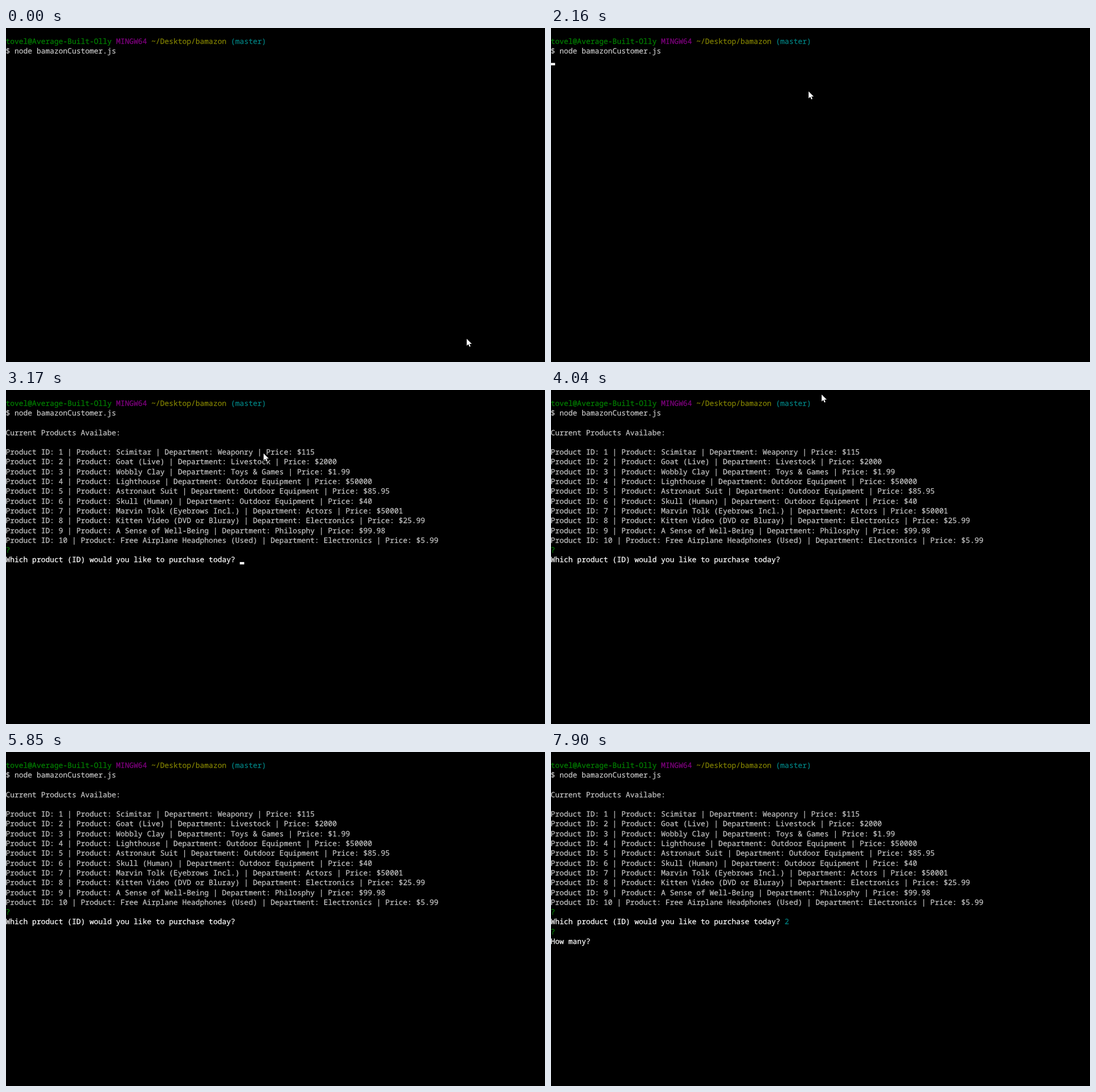
Write an HTML page that moves like this. It is 950 px wide and 590 px high and loops after 8000 ms.

```html
<!DOCTYPE html>
<html lang="en">
<head>
<meta charset="utf-8">
<title>Terminal shop</title>
<style>
  html, body { margin: 0; width: 100%; height: 100%; overflow: hidden; background: #000; }
  svg { display: block; }
  text {
    font: 12.977px "Noto Sans Mono", "DejaVu Sans Mono", monospace;
    font-variant-ligatures: none;
    text-rendering: geometricPrecision;
    white-space: pre;
    color: #c4c4c4;
  }
  tspan { fill: currentColor; stroke: currentColor; stroke-width: 0.25; }
  .green { color: #008000; }
  .purple { color: #800080; }
  .olive { color: #808000; }
  .teal { color: #008080; }
  .white { color: #fff; }
  #pointer { fill: #fff; stroke: #000; stroke-width: 1.6; paint-order: stroke; }
</style>
</head>
<body>
<svg id="stage" width="950" height="590" viewBox="0 0 950 590">
  <g id="screen"></g>
  <rect id="caret" width="7.8" height="4.2" fill="#fff"/>
  <path id="pointer" d="M0 0V12.3L2.9 9.6L4.8 14L6.8 13.2L4.9 8.9H9Z"/>
</svg>
<script>
const LOOP = 8000, LEFT = -0.6, CELL = 7.786, TOP = 27.6, PITCH = 17.3;
const $ = id => document.getElementById(id);
const svg = name => document.createElementNS("http://www.w3.org/2000/svg", name);
const baseline = row => TOP + PITCH * row;

// Adds one terminal line made of [text, colour] runs.
function line(parent, row, ...runs) {
  const text = svg("text");
  text.setAttribute("x", LEFT);
  text.setAttribute("y", Math.round(baseline(row)));
  for (const [str, colour] of runs) {
    const span = svg("tspan");
    span.textContent = str;
    if (colour) span.setAttribute("class", colour);
    text.append(span);
  }
  parent.append(text);
}

// A group of lines visible from one time up to another.
const blocks = [];
function block(from, to) {
  const g = svg("g");
  $("screen").append(g);
  blocks.push({ g, from, to });
  return g;
}

const products = [
  ["Scimitar", "Weaponry", "115"],
  ["Goat (Live)", "Livestock", "2000"],
  ["Wobbly Clay", "Toys & Games", "1.99"],
  ["Lighthouse", "Outdoor Equipment", "50000"],
  ["Astronaut Suit", "Outdoor Equipment", "85.95"],
  ["Skull (Human)", "Outdoor Equipment", "40"],
  ["Marvin Tolk (Eyebrows Incl.)", "Actors", "50001"],
  ["Kitten Video (DVD or Bluray)", "Electronics", "25.99"],
  ["A Sense of Well-Being", "Philosphy", "99.98"],
  ["Free Airplane Headphones (Used)", "Electronics", "5.99"]
];
const question = ["Which product (ID) would you like to purchase today? ", "white"];

const prompt = block(0, LOOP);
line(prompt, 0, ["tovel@Average-Built-Olly ", "green"], ["MINGW64 ", "purple"],
  ["~/Desktop/bamazon ", "olive"], ["(master)", "teal"]);
line(prompt, 1, ["$ node bamazonCustomer.js"]);

const list = block(2240, LOOP);
line(list, 3, ["Current Products Availabe:"]);
products.forEach(([name, dept, price], i) => line(list, 5 + i,
  [`Product ID: ${i + 1} | Product: ${name} | Department: ${dept} | Price: $${price}`]));
line(list, 15, ["?", "green"]);
line(list, 16, question);

const indent = " ".repeat(question[0].length);
line(block(6600, 6670), 16, [indent + "2"]);

const answer = block(6670, LOOP);
line(answer, 16, [indent], ["2", "teal"]);
line(answer, 17, ["?", "green"]);
line(answer, 18, ["How many? ", "white"]);

// Caret: [time, column, row]; a bare time hides it.
const caretSteps = [
  [0], [1090, 25, 1], [1230, 0, 2], [1630], [2160, 0, 2], [2240, 53, 16], [2620],
  [3170, 53, 16], [3720], [4270, 53, 16], [4820], [5280, 53, 16], [5850],
  [6380, 53, 16], [6600, 54, 16], [6670, 10, 18], [6910], [7440, 10, 18], [7900]
];

// Pointer: [time, x, y]; a bare time hides it.
const pointerSteps = [[0, 812, 549]];
for (let k = 1; k <= 6; k++) {
  const u = k / 6, e = u * u * (3 - 2 * u);
  pointerSteps.push([70 + 76 * (k - 1), 812 - 358 * e, 549 - 437 * e]);
}
pointerSteps.push([3960, 468, 56], [4040, 477, 8], [4120]);

const current = (steps, t) => steps.findLast(s => s[0] <= t);
const show = (el, on) => el.setAttribute("visibility", on ? "visible" : "hidden");

function draw() {
  const t = performance.now() % LOOP;
  for (const { g, from, to } of blocks) show(g, t >= from && t < to);

  const [, col, row] = current(caretSteps, t);
  show($("caret"), col !== undefined);
  if (col !== undefined) {
    $("caret").setAttribute("x", LEFT + col * CELL);
    $("caret").setAttribute("y", baseline(row) - 0.5);
  }

  const [, x, y] = current(pointerSteps, t);
  show($("pointer"), x !== undefined);
  if (x !== undefined) {
    $("pointer").setAttribute("transform", `translate(${Math.round(x)} ${Math.round(y)})`);
  }
  requestAnimationFrame(draw);
}
draw();
</script>
</body>
</html>
```
